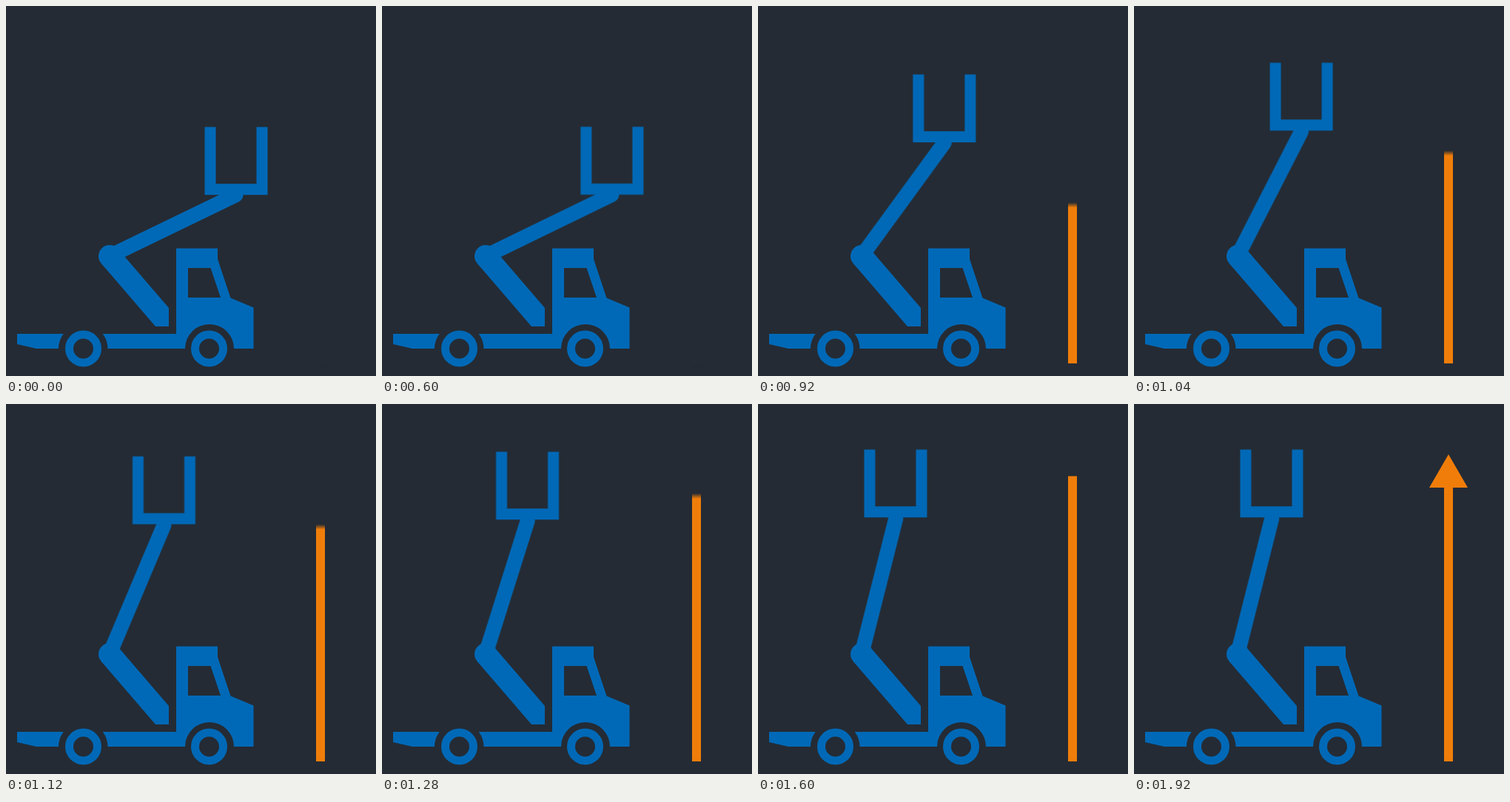
Animation, 500 px wide and 500 px high, one loop 3000 ms. Source, as an HTML page:

```html
<!DOCTYPE html>
<html lang="en">
<head>
<meta charset="utf-8">
<title>Lift truck</title>
<style>
  :root {
    --bg: #242b34;
    --blue: #0069b7;
    --orange: #f07d0a;
    --glide: cubic-bezier(.167, .167, .667, 1);
  }
  html, body { margin: 0; width: 100%; height: 100%; overflow: hidden; background: var(--bg); }
  svg { display: block; width: 100%; height: 100%; }
  .blue { fill: var(--blue); }
  .orange { fill: var(--orange); }
  .beam { stroke: var(--blue); stroke-width: 20; stroke-linecap: round; }
  .basket { fill: none; stroke: var(--blue); stroke-width: 15; }

  .arm, .level, .cover, .head { animation: 3s linear infinite; }
  .arm { transform-origin: 140px 338px; animation-name: raise; }
  .level { transform-origin: 311.9px 254.9px; animation-name: keep-level; }
  .cover { animation-name: reveal; }
  .head { transform-origin: 425px 113px; animation-name: pop; }

  @keyframes raise {
    0% { transform: rotate(0deg); }
    19.867% { transform: rotate(0deg); animation-timing-function: var(--glide); }
    53.2%, 100% { transform: rotate(-50deg); }
  }
  @keyframes keep-level {
    0% { transform: rotate(0deg); }
    19.867% { transform: rotate(0deg); animation-timing-function: var(--glide); }
    53.2%, 100% { transform: rotate(50deg); }
  }
  @keyframes reveal {
    0% { transform: translateY(0); }
    19.867% { transform: translateY(0); animation-timing-function: var(--glide); }
    53.2% { transform: translateY(-388px); }
    53.201%, 100% { transform: translateY(-500px); }
  }
  @keyframes pop {
    0% { transform: scale(0); }
    56.667% { transform: scale(0); animation-timing-function: cubic-bezier(.34, 1.56, .64, 1); }
    63.833%, 100% { transform: scale(1); }
  }
</style>
</head>
<body>
<svg viewBox="0 0 500 500">
  <defs>
    <linearGradient id="fade" x2="0" y2="1">
      <stop stop-color="#242b34"/>
      <stop offset="1" stop-color="#242b34" stop-opacity="0"/>
    </linearGradient>
  </defs>

  <!-- arrow -->
  <rect class="orange" x="419" y="97.5" width="12" height="385.5"/>
  <g class="cover">
    <rect x="416" y="80" width="18" height="403.5" fill="#242b34"/>
    <rect x="416" y="483" width="18" height="7" fill="url(#fade)"/>
  </g>
  <path class="orange head" d="M425 68L451 113H399Z"/>

  <!-- truck body -->
  <g class="blue">
    <path d="M15 443H77.8A33 33 0 0 0 71 463H41L15 457Z"/>
    <path fill-rule="evenodd" d="M130.7 443H230V327.5H286V342L303.5 394.5L334.5 407.5V463H308A33 33 0 0 0 242 463H137.5A33 33 0 0 0 130.7 443Z
      M246 354V394H290L276.5 354Z"/>
    <path d="M128.6 347.8L202 433H220V408L151.4 328.2Z"/>
    <circle cx="140" cy="338" r="15"/>
  </g>
  <g fill="none" stroke="#0069b7" stroke-width="11">
    <circle cx="104.5" cy="463" r="19"/>
    <circle cx="274.5" cy="463" r="19"/>
  </g>

  <!-- upper arm and basket -->
  <g class="arm">
    <line class="beam" x1="140" y1="338" x2="310.4" y2="255.6"/>
    <g class="level">
      <path class="basket" d="M276 163.5V247.7H346V163.5"/>
    </g>
  </g>
</svg>
</body>
</html>
```
